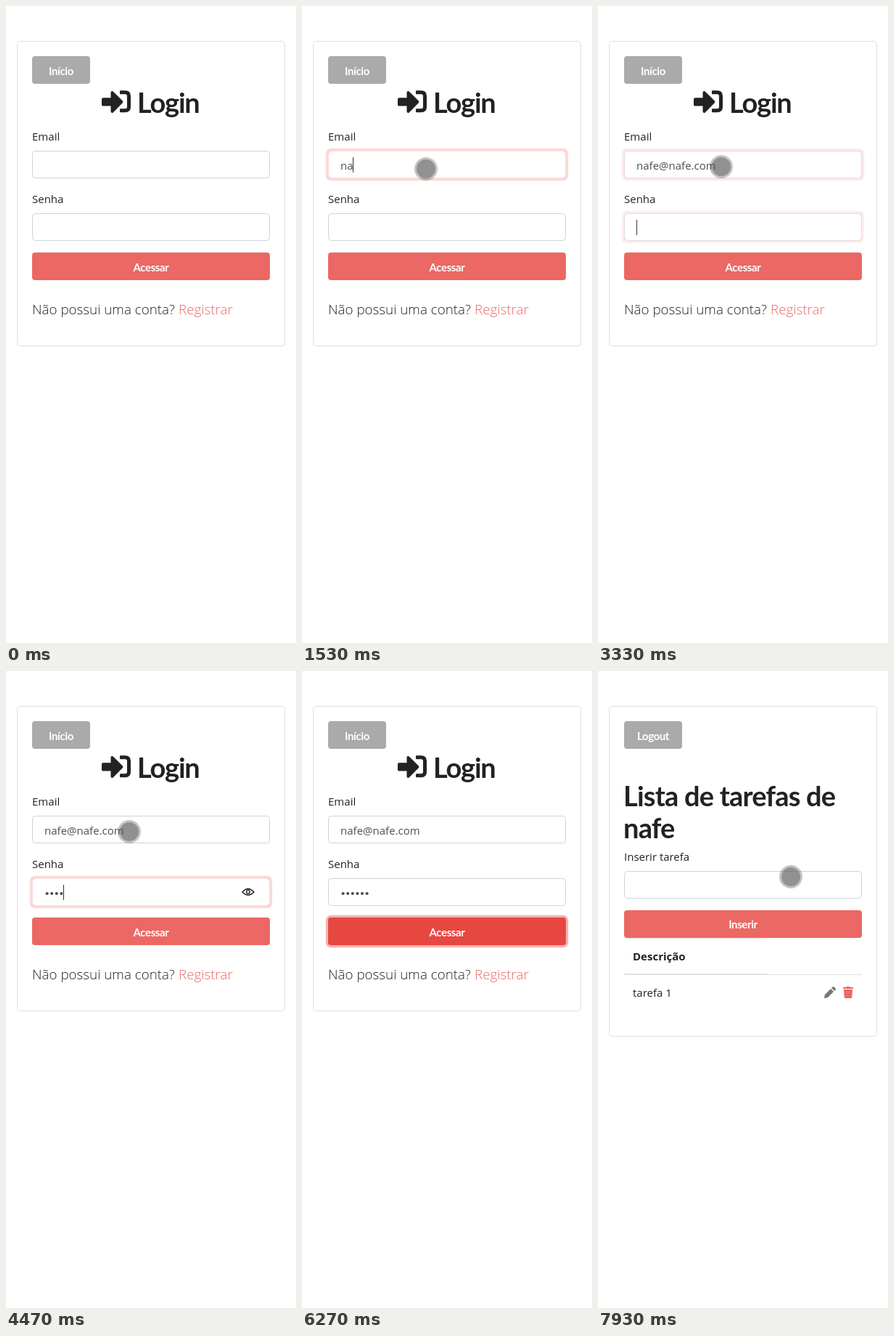
Write an HTML page that moves like this. It is 400 px wide and 876 px high and loops after 8 s.

```html
<!DOCTYPE html>
<html lang="pt">
<head>
<meta charset="utf-8">
<title>Login</title>
<style>
html, body { margin: 0; width: 100%; height: 100%; overflow: hidden; background: #fff; }
svg { display: block; width: 100vw; height: 100vh; }
text { font: 15px "Open Sans", "Noto Sans", sans-serif; fill: #222; }
.head { font: 700 38px Lato, sans-serif; letter-spacing: -.8px; }
.btn { font: 700 15px Lato, sans-serif; letter-spacing: -.4px; fill: #fff; text-anchor: middle; }
.light { font-weight: 300; font-size: 18.8px; }
.value { fill: #495057; }
.bold { font-weight: 700; }
.status { font-size: 10.7px; fill: #5f6368; }
.card { fill: #fff; stroke: #dfdfdf; }
.field { fill: #fff; stroke: #ced4da; }
.glow { fill: #fad9d8; }
.edge { fill: none; stroke: #fbdedd; }
.main { fill: #eb6864; }
.gray { fill: #aaa; }
.line { fill: #dee2e6; }
</style>
</head>
<body>
<svg viewBox="0 0 400 876" preserveAspectRatio="none">
  <g id="login">
    <rect class="card" x="15.5" y="48.5" width="369" height="419" rx="4"/>
    <rect class="gray" x="36" y="69" width="80" height="38" rx="4"/>
    <text class="btn" x="76" y="95">Início</text>
    <g transform="translate(132 111.3) scale(.078125)" fill="#222">
      <path d="M369 247 201 79c-15-15-41-4.500-41 17v96H24q-24 0-24 24v96q0 24 24 24h136v96c0 21.500 26 32 41 17l168-168q14-17 0-34z"/>
      <path d="M332 64h84q96 0 96 96v192q0 96-96 96h-84q-12 0-12-12v-40q0-12 12-12h84q32 0 32-32V160q0-32-32-32h-84q-12 0-12-12V76q0-12 12-12z"/>
    </g>
    <text class="head" x="181" y="147" style="letter-spacing:-1.2px">Login</text>
    <text x="36" y="185">Email</text>
    <text x="36" y="271">Senha</text>
    <g id="email"></g>
    <g id="pass"></g>
    <text id="typed" class="value" x="53" y="225"></text>
    <g id="dots" fill="#495057"></g>
    <g id="eye" fill="none" stroke="#111" stroke-width="1.3">
      <path d="M326 304q8-9 16 0q-8 8-16 0z"/>
      <circle cx="334" cy="303.500" r="2.300"/>
    </g>
    <rect id="caret" y="208" width="1" height="21" fill="#333"/>
    <rect id="ring" x="32.800" y="335.800" width="334.400" height="44.400" rx="7" fill="#f5b3b1"/>
    <rect class="main" x="36" y="339" width="328" height="38" rx="4"/>
    <rect id="hover" x="36" y="339" width="328" height="38" rx="4" fill="#e74741"/>
    <text class="btn" x="200" y="365">Acessar</text>
    <text class="light" x="36" y="424">Não possui uma conta?</text>
    <text class="light main" x="238" y="424" style="fill:#eb6864">Registrar</text>
  </g>
  <g id="list">
    <rect class="card" x="15.5" y="48.5" width="369" height="454" rx="4"/>
    <rect class="gray" x="36" y="69" width="80" height="38" rx="4"/>
    <text class="btn" x="76" y="95">Logout</text>
    <text class="head" x="35" y="186">Lista de tarefas de</text>
    <text class="head" x="35" y="230">nafe</text>
    <text x="36" y="261">Inserir tarefa</text>
    <rect class="field" x="36.5" y="275.5" width="327" height="37" rx="4"/>
    <rect class="main" x="36" y="329" width="328" height="38" rx="4"/>
    <text class="btn" x="200" y="354">Inserir</text>
    <rect class="line" x="36" y="367" width="197" height="1"/>
    <text class="bold" x="48" y="398">Descrição</text>
    <rect class="line" x="36" y="416" width="197" height="2"/>
    <rect class="line" x="233" y="417" width="131" height="1"/>
    <text x="48" y="448">tarefa 1</text>
    <path fill="#777" d="M312 450l.8-4.700 8.300-8.300 3.900 3.900-8.300 8.300zM322 436l1.500-1.500q1.200-1 2.300 0l1.800 1.800q1 1.200 0 2.300l-1.500 1.400z"/>
    <path class="main" d="M338 435.500q0-.5.5-.5h3.700l.7-1h4.200l.7 1h3.700q.5 0 .5.500v1.500h-14zM339 438h12l-.7 10.600q-.1 1.400-1.500 1.400h-7.600q-1.400 0-1.500-1.400z"/>
  </g>
  <g id="status">
    <path d="M-1 854.500H128q3.500 0 3.500 3.500V877H-1z" fill="#f1f3f4" stroke="#dadce0"/>
    <text class="status" x="6" y="869">Aguardando localhost...</text>
  </g>
  <g id="touch" fill="#555">
    <circle r="16" opacity=".35"/>
    <circle r="13" opacity=".46"/>
  </g>
  <path id="arrow" d="M206.5 365.500v16l3.700-3.500 2.600 6.100 2.500-1.100-2.600-5.900h5z" fill="#fff" stroke="#111"/>
</svg>
<script>
const LOOP = 8000, SWAP = 6330, ADDRESS = "nafe@nafe.com";
const $ = id => document.getElementById(id);

// time, number of characters
const keys = [[1530, 2], [1670, 3], [1730, 4], [1870, 5], [2270, 6], [2530, 8],
  [2400, 7], [2600, 9], [2730, 10], [2930, 11], [3000, 12], [3070, 13]].sort((a, b) => a[0] - b[0]);
const dotTimes = [3800, 4000, 4200, 4470, 4730, 4930];
const caretTimes = [670, ...keys.map(k => k[0]), 3270, ...dotTimes];

// start, end, from, to
const moves = [
  [90, 530, 425, 354, 172, 222],
  [810, 1000, 172, 222, 171, 224],
  [1930, 2130, 171, 224, 170, 221],
  [5200, 5600, 170, 221, 211, 370],
  [7870, 7930, 368, 370, 266, 283]
];

function buildField(id, y) {
  $(id).innerHTML =
    `<rect class="glow" x="32.8" y="${y - 3.2}" width="334.4" height="44.4" rx="7"/>
     <rect class="field" x="36.5" y="${y + .5}" width="327" height="37" rx="4"/>
     <rect class="edge" x="36.5" y="${y + .5}" width="327" height="37" rx="4"/>`;
}
buildField("email", 199);
buildField("pass", 285);
$("dots").innerHTML = dotTimes.map((_, i) => `<circle cx="${56.6 + i * 6.6}" cy="306" r="2.1"/>`).join("");

const ramp = (t, start, len = 130) => Math.min(1, Math.max(0, (t - start) / len));
const show = (id, on) => { $(id).style.display = on ? "" : "none"; };
const fade = (el, v) => el.setAttribute("opacity", v);
const focus = (id, v) => $(id).querySelectorAll(".glow, .edge").forEach(el => fade(el, v));
const tick = t => Math.round(Math.floor((t + 3.4) * .015) / .15) * 10;

function pointer(t) {
  const m = moves.filter(m => t >= m[0]).pop();
  if (!m) return [0, 0];
  const p = 1 - (1 - ramp(t, m[0], m[1] - m[0])) ** 2;
  return [m[2] + (m[4] - m[2]) * p, m[3] + (m[5] - m[3]) * p];
}

function drawCaret(t, dots) {
  const last = caretTimes.filter(c => t >= c).pop();
  const on = last !== undefined && t < 5830 && (t - last) % 1060 < 530;
  show("caret", on);
  if (!on) return;
  const second = t >= 3270;
  const width = second ? dots * 6.6 : $("typed").getComputedTextLength();
  $("caret").setAttribute("x", Math.round(53 + width - .3));
  $("caret").setAttribute("y", second ? 294 : 208);
}

function draw(now) {
  const t = tick(now);
  show("login", t < SWAP);
  show("list", t >= SWAP);

  const key = keys.filter(k => t >= k[0]).pop();
  const text = key ? ADDRESS.slice(0, key[1]) : "";
  if ($("typed").textContent !== text) $("typed").textContent = text;
  const dots = dotTimes.filter(d => t >= d).length;
  [...$("dots").children].forEach((c, i) => fade(c, i < dots ? 1 : 0));
  drawCaret(t, dots);

  focus("email", ramp(t, 670) - ramp(t, 3270));
  focus("pass", ramp(t, 3270) - ramp(t, 5830));
  show("eye", t >= 3800 && t < 5870);
  fade($("hover"), ramp(t, 5840));
  fade($("ring"), ramp(t, 5870));

  const [x, y] = pointer(t);
  $("touch").setAttribute("transform", `translate(${Math.round(x)} ${Math.round(y)})`);
  show("touch", (t >= 130 && t < 5870) || t >= 7870);
  show("arrow", t >= 5870 && t < 6130);

  show("status", t >= SWAP && t < 6870);
  fade($("status"), 1 - ramp(t, 6670, 200));
}

const start = performance.now();
function loop() {
  draw((performance.now() - start) % LOOP);
  requestAnimationFrame(loop);
}
loop();
</script>
</body>
</html>
```
